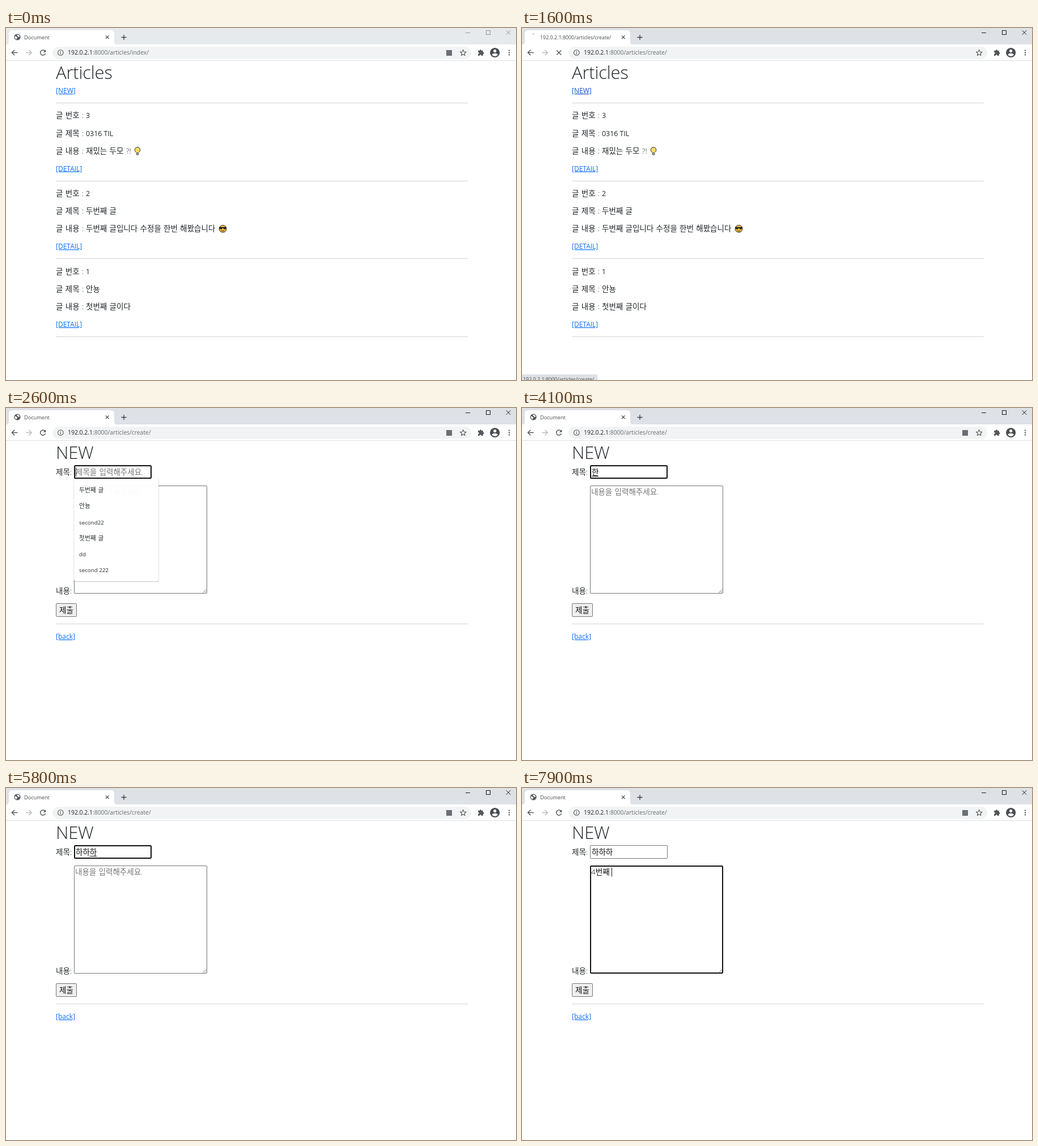
Recreate the animation shown at these times as an HTML page. Size 900 px wide and 622 px high, loop 8 s.

```html
<!DOCTYPE html>
<html lang="ko">
<head>
<meta charset="utf-8">
<title>Articles</title>
<style>
  html, body { margin: 0; width: 100%; height: 100%; overflow: hidden; background: #fff; }
  svg { display: block; font-family: "Open Sans", "Noto Sans CJK KR", "Noto Sans CJK", sans-serif; }
</style>
</head>
<body>
<svg id="stage" width="900" height="622" viewBox="0 0 900 622"></svg>
<script>
const stage = document.getElementById('stage');
const LOOP = 8000, INK = '#212529', ICON = '#55585c', BLUE = '#0d6efd';
const HOST = '192.0.2.1', CREATE = ':8000/articles/create/', INDEX = ':8000/articles/index/';
const HANGUL = /[ㄱ-ㅎ가-힣]/;

// Shape helpers
const rect = (x, y, w, h, fill, more = '') =>
  `<rect x="${x}" y="${y}" width="${w}" height="${h}" fill="${fill}" ${more}/>`;
const circle = (x, y, r, fill, more = '') =>
  `<circle cx="${x}" cy="${y}" r="${r}" fill="${fill}" ${more}/>`;
const line = (d, color, width = 1, more = '') =>
  `<path d="${d}" fill="none" stroke="${color}" stroke-width="${width}" ${more}/>`;
const shape = (d, fill, more = '') => `<path d="${d}" fill="${fill}" ${more}/>`;
const text = (x, y, s, fill = INK, size = HANGUL.test(s) ? 13.5 : 12.4, more = '') =>
  `<text x="${x}" y="${y}" fill="${fill}" font-size="${size}" ` +
  `${HANGUL.test(s) ? 'word-spacing=".8" font-weight="350"' : ''} ${more}>${s}</text>`;
const link = (y, s, fill = BLUE) => text(88, y, s, fill, 12, 'text-decoration="underline"');
const heading = s => text(88, 90, s, INK, 31, 'font-weight="350" letter-spacing="-.2"');
const rule = y => rect(88, y, 727, 1, '#d2d3d4');
const cross = (x, y, r, color, width) =>
  line(`M${x - r} ${y - r}l${2 * r} ${2 * r}m0 ${-2 * r}l${-2 * r} ${2 * r}`, color, width);

function starPath(cx, cy, r) {
  const pts = [];
  for (let i = 0; i < 10; i++) {
    const a = i * Math.PI / 5 - Math.PI / 2, q = i % 2 ? r * .45 : r;
    pts.push((cx + q * Math.cos(a)).toFixed(2) + ' ' + (cy + q * Math.sin(a)).toFixed(2));
  }
  return 'M' + pts.join('L') + 'Z';
}

function globe() {
  return circle(20, 16, 5.6, ICON) +
    shape('M15.8 14.2q2 .2 2.6 1.6q2.2 .2 1.7 1.8l-1.4 .6v2q-3.8-1.6-2.9-6z', '#fff') +
    shape('M19.6 11.7q3.6 .1 4.6 3.3l-1.4 .9l-2.1-.8l-.1-1.2l-1.5-.4z', '#fff');
}

function spinner(t) {
  const a = (t - 1600) * .36 - 100;
  return line('M25.5 16A5.5 5.5 0 0 1 25.2 17.8', '#8a8d91', 1.2, `transform="rotate(${a.toFixed(0)} 20 16)"`);
}

function browser(t) {
  const loading = t >= 1500 && t < 1700;
  const path = t < 1500 ? INDEX : CREATE;
  const focused = t >= 1300;
  const win = focused ? '#18191b' : '#909397';
  let s = rect(0, 0, 900, 29, focused ? '#dee1e6' : '#e7eaed') +
    shape('M0 29.5Q5 29.5 5 24V10Q5 4 11 4H185Q191 4 191 10V24Q191 29.5 196 29.5Z', '#fff') +
    rect(0, 29, 900, 28, '#fff') + rect(0, 57, 900, 1, '#dcdfe3');

  s += loading ? spinner(t) + text(32, 19.5, HOST + CREATE, '#45494d', 8.9)
               : globe() + text(32, 19.5, 'Document', '#45494d', 9.2);
  s += cross(178.7, 16.2, 2.8, '#45494d', 1.2) + line('M203.5 16.5h9m-4.5-4.5v9', '#3c4043', 1.3);
  s += line('M811 8.5h8', win) + rect(847.5, 4.5, 7, 7, 'none', `stroke="${win}"`) + cross(886.5, 8, 3.8, win, 1);

  // Navigation buttons
  s += line('M20.5 43.5h-10m4.6-4.7l-4.7 4.7l4.7 4.7', ICON, 1.5);
  s += line('M35 43.5h10m-4.6-4.7l4.7 4.7l-4.7 4.7', '#bbbdc0', 1.5);
  s += loading ? cross(65.2, 43.5, 4, ICON, 1.5)
    : line('M69.2 41.2A4.6 4.6 0 1 0 69.6 45', ICON, 1.5) + shape('M70.3 38.2v4.6h-4.6z', ICON);

  // Address bar
  s += rect(82, 33, 739, 21.5, '#f1f3f4', 'rx="10.7"') +
    circle(96.3, 43.5, 4.8, 'none', `stroke="${ICON}" stroke-width="1.1"`) +
    rect(95.7, 43, 1.2, 3.2, ICON) + rect(95.7, 40.8, 1.2, 1.3, ICON) +
    `<text x="109" y="47.3" font-size="10.4" fill="#6a6e73"><tspan fill="#202124">${HOST}</tspan>${path}</text>`;
  if (t < 1500 || t >= 2000) s += rect(777, 39, 10, 10, '#6b6e72');
  s += shape(starPath(806.7, 44, 5.6), 'none', `stroke="${ICON}" stroke-width="1.1" stroke-linejoin="round"`);

  // Extensions, profile, menu
  s += shape('M833 40h2.7a1.7 1.7 0 0 1 3.4 0h2.7v2.8a1.7 1.7 0 0 1 0 3.4v2.8h-2.8a1.7 1.7 0 0 0-3.4 0h-2.6v-2.8a1.7 1.7 0 0 0 0-3.4z', ICON);
  s += circle(862.7, 43.5, 8.6, '#4a4d51') + circle(862.7, 40.6, 2.6, '#fff') +
    shape('M857.5 47.6q.4-2.8 5.2-2.8t5.2 2.8q-2 2.4-5.2 2.4t-5.2-2.4z', '#fff');
  for (const y of [39.6, 43.5, 47.4]) s += circle(888, y, 1.2, ICON);
  return s;
}

function bulb(x, y) {
  return circle(x, y - 2, 4.8, '#fcdc62', 'stroke="#222"') +
    shape(`M${x - 3} ${y + 1}l1 2.4h4l1-2.4z`, '#fcdc62') +
    rect(x - 1.9, y + 3, 3.8, 3.6, '#b8bcc0', 'stroke="#222" stroke-width=".9" rx="1"');
}

function coolFace(x, y) {
  return circle(x, y, 6.4, '#fcc03c', 'stroke="#222"') +
    shape(`M${x - 6.4} ${y - 3}h12.8v1.2q-.8 2.8-3.2 2.8q-2.2 0-2.6-2.4h-1.2q-.4 2.4-2.6 2.4q-2.4 0-3.2-2.8z`, '#1e1e20') +
    line(`M${x - 3} ${y + 3}q3 2 6 0`, '#222');
}

const articles = [
  ['3', '0316 TIL', '재밌는 두모 ?!'],
  ['2', '두번째 글', '두번째 글입니다 수정을 한번 해봤습니다'],
  ['1', '안뇽', '첫번째 글이다']
];

function listPage(t) {
  let s = heading('Articles') + link(115, '[NEW]', t < 1100 ? BLUE : '#0a58ca') + rule(132);
  articles.forEach((values, j) => {
    const y = 159.3 + 137.7 * j;
    ['번호', '제목', '내용'].forEach((label, i) => {
      s += text(88, y + 31.2 * i, `글 ${label} :`) + text(141, y + 31.2 * i, values[i]);
    });
    s += link(y + 93.2, '[DETAIL]') + rule(Math.round(132 + 137.7 * (j + 1)));
  });
  return s + bulb(232, 217.5) + coolFace(382.6, 354.8);
}

// Typing steps: [time, text, caret x, width of the syllable being composed]
const titleKeys = [
  [2200, '', 123], [3400, 'ㅎ', 135, 12], [3500, '하', 135, 12], [3600, '한', 135, 12],
  [4200, '하', 135, 12], [4300, '핳', 135, 12], [4400, '하하', 148, 12],
  [4900, '하핳', 148, 12], [5000, '하하하', 160, 12]
];
const bodyKeys = [
  [5900, '', 122], [7100, '4', 130], [7300, '4버', 142, 12], [7400, '4번', 142, 12],
  [7700, '4번째', 154, 12], [7900, '4번째 ', 158]
];

function field(t, keys, end, [bx, by, w, h], x, y, hint) {
  const key = keys.filter(k => k[0] <= t).pop();
  const active = key && t < end;
  const stroke = active ? 2 : 1;
  let s = rect(bx + stroke / 2, by + stroke / 2, w - stroke, h - stroke, '#fff',
    `rx="1.5" stroke="${active ? '#101010' : '#767676'}" stroke-width="${stroke}"`);
  s += key && key[1] ? text(x, y, key[1], '#111', 13.5) : text(x, y, hint, '#757575');
  if (active) {
    const [time, , caret, width] = key;
    if (width) s += rect(caret - width, y + 2.5, width, 1, '#111');
    const start = t >= 2600 && t < 3400 ? 2600 : time;
    if (Math.floor((t - start) / 500) % 2 === 0) s += rect(caret, y - 12.5, 1, 16, '#111');
  }
  return s;
}

function suggestions(t) {
  if (t < 2600 || t >= 3600) return '';
  const fade = t < 3400 ? .97 : t < 3500 ? .6 : .25;
  let s = rect(119.5, 126, 150.5, 182, '#000', 'rx="3" opacity=".05"') +
    rect(119.5, 125, 150, 182, '#000', 'rx="3" opacity=".16"') +
    rect(120, 125, 149, 181, '#fff', 'rx="3"');
  ['두번째 글', '안뇽', 'second22', '첫번째 글', 'dd', 'second 222'].forEach((item, i) => {
    s += text(129, 149.3 + 28.1 * i, item, INK, HANGUL.test(item) ? 10.8 : 9.8);
  });
  return `<g opacity="${fade}">${s}</g>`;
}

function formPage(t) {
  return heading('NEW') + text(88, 117.5, '제목:') + text(88, 328, '내용:') +
    field(t, bodyKeys, LOOP, [120, 137, 235, 191], 122, 153, '내용을 입력해주세요.') +
    line('M347.5 326.5l6-6m-2.5 6l2.5-2.5', '#777') +
    field(t, titleKeys, 5900, [120, 101, 137, 24], 123, 117.5, '제목을 입력해주세요.') +
    rect(88.5, 345.5, 36, 23, '#efefef', 'rx="1.5" stroke="#767676"') + text(94, 361.8, '제출', '#111') +
    rule(381) + link(408, '[back]') + suggestions(t);
}

function status(t) {
  if (t < 1300 || t >= 2100) return '';
  const fade = t < 1400 ? .5 : t < 1900 ? 1 : t < 2000 ? .65 : .3;
  return `<g opacity="${fade}">` + rect(-4, 612, 137.5, 16, '#dee1e6', 'rx="3"') +
    text(2, 623.5, HOST + CREATE, '#4c5054', 8.9) + '</g>';
}

const begin = performance.now();
let shown = -1;
function draw(now) {
  const t = Math.floor(Math.max(0, now - begin) % LOOP / 100) * 100;
  if (t !== shown) {
    shown = t;
    stage.innerHTML = (t < 1700 ? listPage(t) : formPage(t)) + browser(t) + status(t);
  }
  requestAnimationFrame(draw);
}
draw(begin);
</script>
</body>
</html>
```
